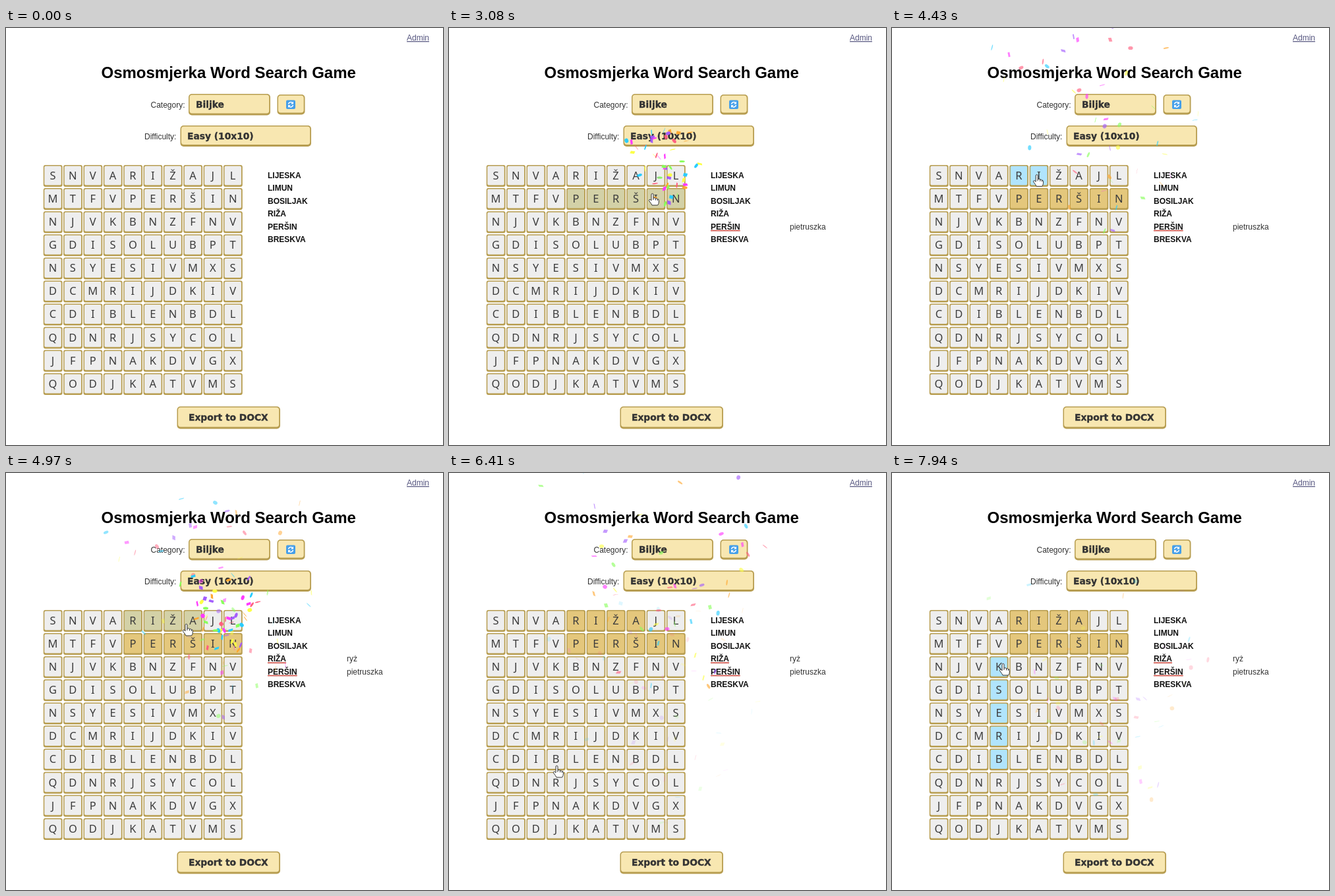
Write an HTML page that moves like this. It is 663 by 633 pixels and loops after 8 s.

```html
<!DOCTYPE html>
<html lang="en">
<head>
<meta charset="utf-8">
<title>Word search</title>
<style>
html, body { margin: 0; width: 100%; height: 100%; overflow: hidden; background: #fff; }
svg { display: block; width: 100vw; height: 100vh; }
text { font: 12px "Liberation Sans", Arial, sans-serif; fill: #333; }
.title { font-size: 24px; font-weight: bold; fill: #000; }
.link { fill: #55557f; text-decoration: underline; }
.word { font-weight: bold; fill: #111; }
.button { font: bold 13.8px "DejaVu Sans", Verdana, sans-serif; stroke: #333; stroke-width: .35; }
.letter { font: 16.5px "Noto Sans", "Open Sans", sans-serif; fill: #3c3c3c; text-anchor: middle; }
</style>
</head>
<body>
<svg id="stage" viewBox="0 0 663 633" preserveAspectRatio="none"></svg>
<script>
const stage = document.getElementById('stage');
const LOOP = 8000, STEP = 90;
const GOLD = [228, 199, 124], BLUE = [176, 228, 253], GREY = [238, 238, 238];
const EDGE = '#b79d50', CREAM = '#f8e7b1';

function add(tag, attrs, parent = stage) {
  const el = document.createElementNS('http://www.w3.org/2000/svg', tag);
  for (const key in attrs) el.setAttribute(key, attrs[key]);
  parent.appendChild(el);
  return el;
}
function label(x, y, str, cls = '', parent = stage) {
  const el = add('text', { x, y, class: cls }, parent);
  el.textContent = str;
  return el;
}
function box(x, y, w, h, r, fill, foot) {
  add('rect', { x, y, width: w, height: h, rx: r, fill: EDGE });
  return add('rect', { x: x + 1.5, y: y + 1.5, width: w - 3.3, height: h - 1.5 - foot, rx: r - 1, fill });
}
function button(x, y, w, h, indent = 0, str = '') {
  box(x, y, w, h, 5, CREAM, 3);
  label(x + indent, y + 21, str, 'button');
}
const rgb = c => `rgb(${c.map(Math.round)})`;
const mix = (a, b, k) => a.map((v, i) => v + (b[i] - v) * k);

// Header and controls
label(608, 19, 'Admin', 'link');
label(144.5, 76, 'Osmosmjerka Word Search Game', 'title');
label(219.5, 121, 'Category:');
label(210, 168.5, 'Difficulty:');
button(277, 100, 124, 32.5, 11, 'Biljke');
button(264.5, 148, 198.5, 32, 10.5, 'Easy (10x10)');
button(259.5, 574.5, 156.5, 34, 17.5, 'Export to DOCX');
button(411.5, 101, 42, 30.5);
add('rect', { x: 425, y: 109.5, width: 14, height: 13.5, rx: 2, fill: '#459fe9' });
add('path', {
  d: 'M428.5 115.5A3.6 3.6 0 0 1 434.5 113.5M435.5 117A3.6 3.6 0 0 1 429.5 119',
  fill: 'none', stroke: '#fff', 'stroke-width': 1.6
});
add('path', { d: 'M436 111.5v4h-4zM428 121v-4h4z', fill: '#fff' });

// Letter grid
const ROWS = ['SNVARIŽAJL', 'MTFVPERŠIN', 'NJVKBNZFNV', 'GDISOLUBPT', 'NSYESIVMXS',
  'DCMRIJDKIV', 'CDIBLENBDL', 'QDNRJSYCOL', 'JFPNAKDVGX', 'QODJKATVMS'];
const LEFT = 56.8, TOP = 208, PITCH_X = 30.35, PITCH_Y = 35.1;
const cells = [];
ROWS.forEach((row, r) => [...row].forEach((ch, c) => {
  const x = LEFT + c * PITCH_X, y = TOP + r * PITCH_Y;
  const face = box(x, y, 28.8, 33, 3, rgb(GREY), 2.5);
  label(x + 14.2, y + 21.8, ch, 'letter');
  cells.push({ c, r, face });
}));

// Each drag marks cells from start to the pointer, and finds a word on release
const drags = [
  { start: [4, 1], end: [9, 1], down: 1300, up: 3000, word: 'PERŠIN', gloss: 'pietruszka' },
  { start: [4, 0], end: [7, 0], down: 4200, up: 4890, word: 'RIŽA', gloss: 'ryż' },
  { start: [3, 6], down: 7100, up: LOOP }
];
['LIJESKA', 'LIMUN', 'BOSILJAK', 'RIŽA', 'PERŠIN', 'BRESKVA'].forEach((word, i) => {
  const y = 228 + i * 19.45;
  const el = label(397, y, word, 'word');
  const drag = drags.find(d => d.word === word);
  if (!drag) return;
  drag.group = add('g', {});
  add('rect', { x: 397, y: y + 1, width: el.getComputedTextLength(), height: 1.6, fill: '#cc4a40' }, drag.group);
  label(517, y, drag.gloss, '', drag.group);
});

// Pointer stops: time, x, y
const STOPS = [[370, 594, 214], [1180, 193, 270], [1450, 194, 274], [2170, 320, 274], [2800, 342, 264],
  [3080, 311, 260], [3890, 201, 231], [4200, 196, 231], [4930, 279, 232], [6410, 166, 453],
  [7310, 169, 428], [7940, 171, 298]];
function pointer(t) {
  const i = Math.max(1, STOPS.findIndex(stop => t <= stop[0]));
  const a = STOPS[i - 1], b = STOPS[i];
  return mix(a, b, Math.max(0, (t - a[0]) / (b[0] - a[0]))).slice(1);
}
const between = (v, a, b) => v >= Math.min(a, b) && v <= Math.max(a, b);
const within = (a, b, cell) => between(cell.c, a[0], b[0]) && between(cell.r, a[1], b[1]);

function selected(cell, t) {
  const drag = drags.find(d => t >= d.down && t < d.up);
  if (!drag) return false;
  const [x, y] = pointer(t);
  const tip = [Math.floor((x - 2 - LEFT) / PITCH_X), Math.floor((y - 8 - TOP) / PITCH_Y)];
  return within(drag.start, tip, cell);
}
function cellColor(cell, t) {
  const found = drags.find(d => d.word && t >= d.up && within(d.start, d.end, cell));
  if (found) return mix(BLUE, GOLD, Math.min(1, (t - found.up) / 120));
  if (!selected(cell, t)) return GREY;
  return selected(cell, t - STEP) ? BLUE : mix(GREY, BLUE, .65);
}

// Confetti: pieces fly up from the stage centre, slow by 0.9 a tick and sink steadily
let seed = 11;
const rand = () => (seed = (seed * 16807) % 2147483647) / 2147483647;
const CX = 331, CY = 316, SCALE = .75, LIFE = 200, TICK = 20, COUNT = 50;
const COLORS = ['#26ccff', '#a25afd', '#ff5e7e', '#88ff5a', '#fcff42', '#ffa62d', '#ff36ff'];

function piece(_, i) {
  const angle = (rand() - .5) * Math.PI / 4, speed = 22.5 + rand() * 45;
  return {
    dx: Math.sin(angle) * speed, dy: -Math.cos(angle) * speed,
    size: rand() + 2, round: rand() < .5,
    wobble: rand() * 10, sway: Math.min(.11, rand() * .1 + .05), tilt: (rand() * .5 + .25) * Math.PI,
    el: add('path', { fill: COLORS[i % COLORS.length] })
  };
}
const bursts = drags.filter(d => d.word).map(d => ({ at: d.up, pieces: Array.from({ length: COUNT }, piece) }));

function shape(p, n) {
  const reach = 10 * (1 - Math.pow(.9, n));
  const x = CX + SCALE * p.dx * reach, y = CY + SCALE * (p.dy * reach + 3 * n);
  const wobble = p.wobble + p.sway * n, tilt = p.tilt + .1 * n;
  const wx = SCALE * 10 * Math.cos(wobble), wy = SCALE * 10 * Math.sin(wobble);
  const tx = SCALE * p.size * Math.cos(tilt), ty = SCALE * p.size * Math.sin(tilt);
  if (!p.round) return `M${x} ${y}l${wx} ${ty}l${tx} ${wy}L${x + tx} ${y + wy}Z`;
  const rx = Math.max(.3, Math.abs(wx) * .6), ry = Math.max(.3, Math.abs(wy) * .6);
  const turn = Math.PI / 10 * wobble, ex = rx * Math.cos(turn), ey = rx * Math.sin(turn);
  const arc = `a${rx} ${ry} ${turn * 180 / Math.PI} 1 1 `;
  return `M${x - ex} ${y - ey}${arc}${2 * ex} ${2 * ey}${arc}${-2 * ex} ${-2 * ey}Z`;
}
function drawBurst(burst, t) {
  const n = (t - burst.at) / TICK;
  const live = n > 0 && n < LIFE;
  for (const p of burst.pieces) {
    p.el.setAttribute('d', live ? shape(p, n) : '');
    p.el.setAttribute('fill-opacity', live ? 1 - n / LIFE : 0);
  }
}

const hand = add('path', {
  d: 'M-4-7q0-1.7 1.5-1.7q1.5 0 1.5 1.7V-2q3-.6 3.6 .8q2.2-.5 2.8 1q2-.2 2 1.8V4q0 2.5-1.8 5H-3' +
     'q-1-2.5-4-6q-1.4-2 0-2.6q1.5-.4 3 1.6ZM-1-2V1M2.6-1.2V1.5M5.4-.2V2',
  fill: '#fff', stroke: '#333', 'stroke-width': 1, 'stroke-linejoin': 'round'
});

// The picture advances in steps, with one pause before the last letter
function snap(t) {
  if (t < 370) return 0;
  if (t < 2540) return Math.min(2170, 370 + Math.floor((t - 370) / STEP) * STEP);
  return 2540 + Math.floor((t - 2540) / STEP) * STEP;
}
function draw(time) {
  const t = snap(time % LOOP);
  for (const cell of cells) cell.face.setAttribute('fill', rgb(cellColor(cell, t)));
  for (const d of drags) if (d.group) d.group.setAttribute('visibility', t >= d.up ? 'visible' : 'hidden');
  for (const burst of bursts) drawBurst(burst, t);
  hand.setAttribute('transform', `translate(${pointer(t)})`);
  hand.setAttribute('visibility', t >= 370 ? 'visible' : 'hidden');
}

const begin = performance.now();
function frame() {
  draw(performance.now() - begin);
  requestAnimationFrame(frame);
}
frame();
</script>
</body>
</html>
```
